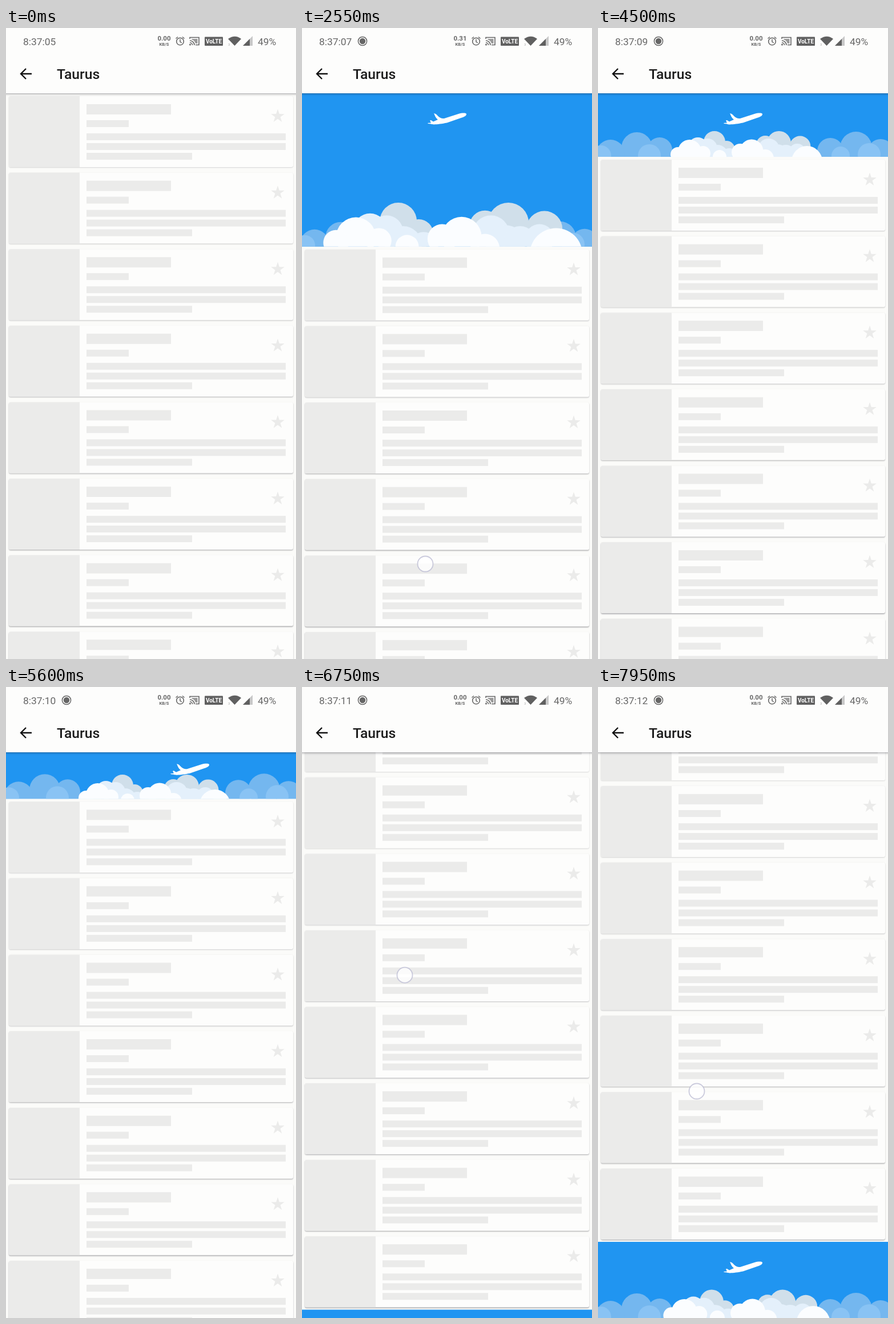
Animation of 508 by 1102 pixels, one loop 8 s. Source, as an HTML page with a canvas:

```html
<!DOCTYPE html>
<html lang="en">
<head>
<meta charset="utf-8">
<title>Pull to refresh</title>
<style>
  html, body { margin: 0; width: 100%; height: 100%; overflow: hidden; background: #fbfbf9; }
  canvas { display: block; width: 508px; height: 1102px; }
</style>
</head>
<body>
<canvas id="stage" width="508" height="1102"></canvas>
<script>
const LOOP = 8000, W = 508, H = 1102;
const BAR = 114, PITCH = 133.6, CARDS = 10, MAX_SCROLL = 347.4, REST = 111;
const PAPER = '#fdfdfc', BLOCK = '#ebebea', SKY = '#2095f1', GREY = '#666';
const ctx = document.getElementById('stage').getContext('2d');

// Cloud puffs: x, height of the centre above the base, radius.
const sideClouds = [
  ['#74b7ef', [[68, 16, 27], [22, 5, 25], [108, 12, 22], [452, 16, 28], [407, 10, 23], [495, 8, 23]]],
  ['#89c3f4', [[5, 2, 18], [90, 2, 20], [475, 4, 20], [425, 2, 16]]]
];
const centreClouds = [
  ['#d0dfea', [[-50, 26, 19], [-29, 13, 15], [63, 24, 21], [100, 18, 18.5], [39, 21, 16]]],
  ['#e4f0fb', [[-79, 17, 17], [-62, 15, 17], [-45, 2, 19], [-24, 0, 15], [45, 13, 19], [60, 2, 20],
    [75, 4, 17], [95, 8, 15]]],
  ['#fbfdff', [[-93.5, 9.5, 20.5], [-114, 4, 13], [-70, 6, 13], [-41, 0, 12], [15, 10, 20.5],
    [-5, 8, 15], [39, -2, 15], [112, -8, 27]]]
];

const clamp = v => Math.max(0, Math.min(1, v));
const phase = (t, from, to) => clamp((t - from) / (to - from));
const smooth = u => u * u * (3 - 2 * u);
const remaining = u => (1 - u) ** 2;
const mix = (a, b, u) => a + (b - a) * u;

// Finger travel to pull distance: half speed, then stiffer past the trigger.
function resist(travel) {
  const d = Math.max(0, travel) / 2;
  return d < REST ? d : REST + (d - REST) * 0.7;
}

function stateAt(t) {
  const s = { top: 0, bottom: 0, scroll: 0, finger: null, leaving: t >= 5500, bob: 0 };
  if (t < 2650) {
    const u = smooth(phase(t, 1600, 2530));
    s.top = resist(670 * u);
    if (t >= 1600) s.finger = [mix(200, 216, u), 266 + 670 * u];
  } else if (t < 5500) {
    s.top = mix(REST, resist(670), remaining(phase(t, 2650, 3350)));
    if (t > 3350) s.bob = 3 * Math.sin((t - 4500) / 1000 * Math.PI * 2);
  } else {
    s.top = REST * remaining(phase(t, 5500, 6200));
  }
  if (t >= 6500) {
    const swipe = 500 * smooth(phase(t, 6450, 6895));
    s.scroll = Math.min(swipe, MAX_SCROLL);
    s.bottom = resist(swipe - MAX_SCROLL) * remaining(phase(t, 6895, 7595));
    if (t < 6895) s.finger = [180, 880 - swipe];
    if (t >= 7400) {
      const travel = 285 * phase(t, 7400, 7950) ** 1.3;
      s.bottom = Math.max(s.bottom, resist(travel));
      s.finger = [mix(182, 173, travel / 285), 991 - travel];
    }
  }
  return s;
}

function rect(x, y, w, h, color) {
  ctx.fillStyle = color;
  ctx.fillRect(x, y, w, h);
}

function shape(points, color) {
  ctx.beginPath();
  points.forEach(([x, y]) => ctx.lineTo(x, y));
  ctx.closePath();
  ctx.fillStyle = color;
  ctx.fill();
}

function path(d, color, width) {
  const p = new Path2D(d);
  if (width) {
    ctx.strokeStyle = color;
    ctx.lineWidth = width;
    ctx.stroke(p);
  } else {
    ctx.fillStyle = color;
    ctx.fill(p);
  }
}

function disc(x, y, r, fill, stroke, width) {
  ctx.beginPath();
  ctx.arc(x, y, r, 0, 7);
  if (fill) { ctx.fillStyle = fill; ctx.fill(); }
  if (stroke) { ctx.strokeStyle = stroke; ctx.lineWidth = width; ctx.stroke(); }
}

function text(str, x, y, size, weight, color, align = 'left') {
  ctx.font = `${weight} ${size}px Roboto, sans-serif`;
  ctx.textAlign = align;
  ctx.fillStyle = color;
  ctx.fillText(str, x, y);
}

function card(y) {
  if (y > H || y < BAR - 130) return;
  const depth = (y + 124) / H;
  ctx.save();
  ctx.shadowColor = `rgba(40,40,50,${0.16 + 0.24 * depth})`;
  ctx.shadowBlur = 2;
  ctx.shadowOffsetY = 0.6 + 0.9 * depth;
  ctx.beginPath();
  ctx.roundRect(5, y, 498, 124, 3);
  ctx.fillStyle = PAPER;
  ctx.fill();
  ctx.restore();
  ctx.beginPath();
  ctx.roundRect(5, y, 124, 124, [3, 0, 0, 3]);
  ctx.fillStyle = BLOCK;
  ctx.fill();
  for (const [top, w, h] of [[14, 148, 18], [42, 74, 12], [65, 349, 12], [82, 349, 12], [99, 185, 12]])
    rect(141, y + top, w, h, BLOCK);
  shape(Array.from({ length: 10 }, (_, i) => {
    const r = i % 2 ? 4.8 : 12.4, a = i * Math.PI / 5;
    return [476 + r * Math.sin(a), y + 35 - r * Math.cos(a)];
  }), BLOCK);
}

function clouds(layers, x, base, scale) {
  for (const [color, puffs] of layers)
    for (const [px, py, r] of puffs) disc(x + px * scale, base - py * scale, r * scale, color);
}

function plane(x, y) {
  ctx.save();
  ctx.translate(x, y);
  path('M34-8.500C34-11 27-11 20-9L-5-1C-11-1-14-3-17-6.500-19-9-21-9.500-23-10-21-6-20-2-16 1L-24 4.500-28 2-30 2.500-28 6.500-34 7-33 8-28 8.500C-26 10.500-12 9 0 6.500L26-2.500C31-4 34-6 34-8.500Z', '#fff');
  ctx.restore();
}

function sky(top, h, base, leaving, bob) {
  if (h <= 0) return;
  const p = h / REST, q = Math.min(1, p);
  ctx.save();
  ctx.beginPath();
  ctx.rect(0, top, W, h);
  ctx.clip();
  rect(0, top, W, h, SKY);
  clouds(sideClouds, 0, base, 1);
  clouds(centreClouds, 254, base + 10 * (1 - q), 1 + Math.max(0, p - 1) / 2 + bob / 150);
  plane(leaving ? 254 * (2 - q) : 254 * q, top + 45 + (leaving ? -55 : 55) * (1 - q) + bob);
  ctx.restore();
}

function statusBar(t) {
  const second = t < 1050 ? 5 : 6 + Math.floor((t - 1050) / 1000);
  text('8:37:' + String(second).padStart(2, '0'), 30, 29.5, 17.4, 400, GREY);
  ctx.globalAlpha = phase(t, 200, 550);
  disc(106, 23, 7.6, null, GREY, 1.5);
  disc(106, 23, 5.2, GREY);
  ctx.globalAlpha = 1;

  text(t >= 850 && t < 3850 ? '0.31' : '0.00', 277, 22, 11.5, 700, GREY, 'center');
  text('KB/S', 277, 30.5, 7.5, 700, GREY, 'center');

  disc(305, 23.5, 6.3, null, GREY, 1.6);
  path('M305 19.5V24L308 26M297.5 18.5L301 15.5M309 15.5L312.5 18.5', GREY, 1.5);

  path('M322 19V16.5H338V29.5H332M322 22A8 8 0 0 1 330 30M322 25.5A4.5 4.5 0 0 1 326.5 30', GREY, 1.6);
  path('M325 19H335.5V27H332A11 11 0 0 0 325 20Z', '#999');
  disc(322.5, 29, 1.5, GREY);

  ctx.beginPath();
  ctx.roundRect(348, 15.5, 32, 15.5, 1);
  ctx.fillStyle = '#606060';
  ctx.fill();
  text('VoLTE', 364, 26.8, 10, 700, '#fff', 'center');

  path('M389 19Q401 10.5 412 19L400.5 31Z', '#606060');
  text('3', 389, 31, 6, 400, '#aaa');
  shape([[432, 14], [432, 31], [415, 31]], '#c8c8c8');
  shape([[427, 19], [427, 31], [415, 31]], '#606060');
  text('49%', 441, 29.5, 17.4, 400, GREY);
}

function header(t) {
  ctx.save();
  ctx.shadowColor = 'rgba(30,30,40,.45)';
  ctx.shadowBlur = 4;
  ctx.shadowOffsetY = 1;
  rect(-10, -10, W + 20, BAR + 10, PAPER);
  ctx.restore();
  statusBar(t);
  path('M45 80H27M35 71L26 80 35 89', '#111', 2.4);
  text('Taurus', 89, 89, 24.7, 500, '#1c1c1c');
}

function draw(t) {
  const s = stateAt(t);
  rect(0, 0, W, H, '#fbfbf9');
  for (let i = 0; i < CARDS; i++) card(119 + i * PITCH + s.top - s.scroll - s.bottom);
  sky(BAR, s.top, BAR + s.top, s.leaving, s.bob);
  sky(H - s.bottom, s.bottom, H - s.bottom + Math.max(133, s.bottom), false, 0);
  header(t);
  if (s.finger) disc(...s.finger, 13.5, 'rgba(255,255,255,.8)', 'rgba(185,185,210,.75)', 1.8);
}

const start = performance.now();
function tick() {
  draw((performance.now() - start) % LOOP);
  requestAnimationFrame(tick);
}
tick();
</script>
</body>
</html>
```
